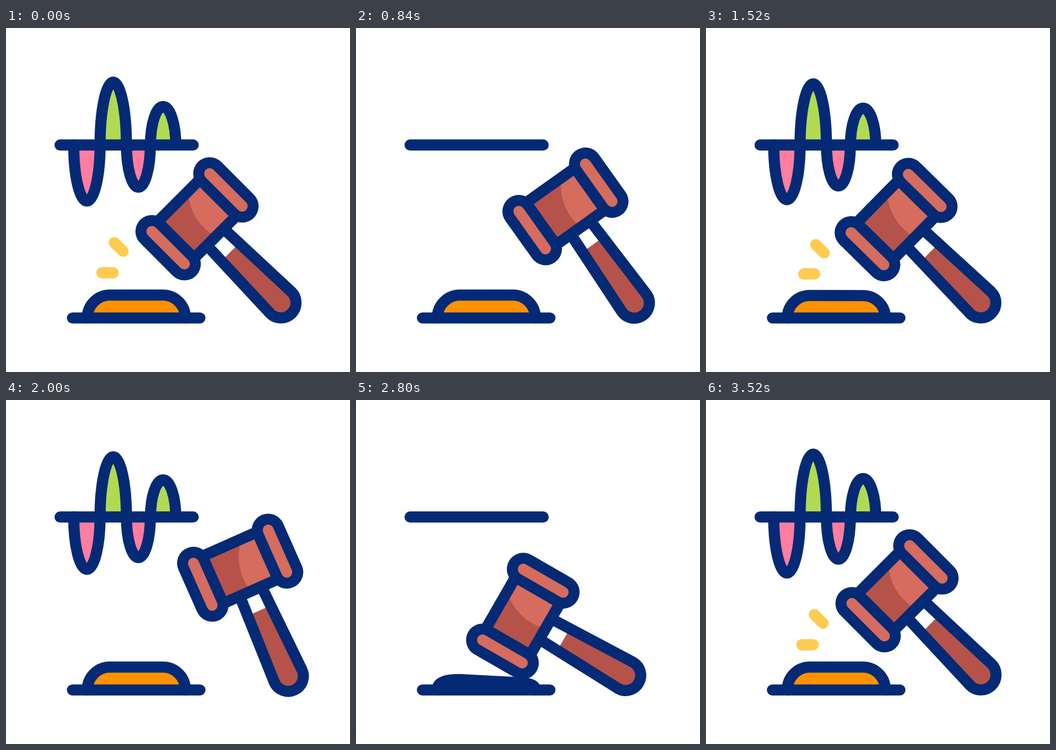
Recreate the animation shown at these times as an HTML page with a canvas. Size 640 by 640 pixels, loop 3.6 s.

```html
<!DOCTYPE html>
<html lang="en">
<head>
<meta charset="utf-8">
<title>Gavel</title>
<style>
  html, body { margin: 0; width: 100%; height: 100%; overflow: hidden; background: #fff; }
  canvas { display: block; width: 100vmin; height: 100vmin; }
</style>
</head>
<body>
<canvas id="stage" width="640" height="640"></canvas>
<script>
const ctx = document.getElementById('stage').getContext('2d');

const NAVY = '#042a75', GREEN = '#b1da53', PINK = '#ff7da1', ORANGE = '#ff9100';
const YELLOW = '#ffcb50', LIGHT = '#d56c5e', DARK = '#b5534a';
const LINE = 20.7;

// Two equal strokes, then a short rest until the loop ends.
const LOOP = 3600, CYCLE = 1760, HIT = 1057;
const LIFT_START = 25, LIFT_END = 268, LIFT = 21.9, STRIKE = -18.1;
const AXIS_Y = 217.7, FLOOR_Y = 539.5;

const waves = [
  { x: 150.5, rx: 24.5, h: 104.3, fill: PINK, fall: [158, 517], grow: 1067, rate: .0077 },
  { x: 199.5, rx: 24.5, h: -117, fill: GREEN, fall: [174, 533], grow: 1099, rate: .0082 },
  { x: 246.3, rx: 22.2, h: 78.5, fill: PINK, fall: [177, 530], grow: 1099, rate: .0081 },
  { x: 292.3, rx: 23.5, h: -71.5, fill: GREEN, fall: [171, 615], grow: 1099, rate: .0072 }
];

const sparks = [
  { x: 209.7, y: 407.3, dx: 81, dy: 123, angle: Math.PI / 4, length: 23 },
  { x: 189, y: 455.5, dx: 112, dy: 71.5, angle: 0, length: 21 }
];

const clamp = v => Math.min(1, Math.max(0, v));
const smooth = v => { v = clamp(v); return v * v * (3 - 2 * v); };

// Share still left of a decay that starts at `start` and ends with the cycle.
function decay(p, start, rate = .0073) {
  const end = Math.exp(-rate * (CYCLE - start));
  return (Math.exp(-rate * (p - start)) - end) / (1 - end);
}

function outline(fill) {
  if (fill) {
    ctx.fillStyle = fill;
    ctx.fill();
  }
  ctx.strokeStyle = NAVY;
  ctx.lineWidth = LINE;
  ctx.stroke();
}

function segment(x1, y1, x2, y2, width = LINE, color = NAVY) {
  ctx.beginPath();
  ctx.moveTo(x1, y1);
  ctx.lineTo(x2, y2);
  ctx.lineWidth = width;
  ctx.strokeStyle = color;
  ctx.stroke();
}

function drawWaves(p) {
  for (const { x, rx, h, fill, fall, grow, rate } of waves) {
    const size = p < grow ? 1 - smooth((p - fall[0]) / fall[1]) : 1 - decay(p, grow, rate);
    if (size < .002) continue;
    ctx.beginPath();
    ctx.ellipse(x, AXIS_Y, rx, Math.abs(h) * size, 0, Math.PI, 0, h > 0);
    outline(fill);
  }
  segment(100.6, AXIS_Y, 348.2, AXIS_Y);
}

function drawPad(p) {
  const press = p < HIT ? Math.pow(clamp((p - 970) / (HIT - 970)), 1.3) : decay(p, HIT);
  const left = 496.8 + 31 * press, right = 496.8 + 38 * press;
  const rise = .55 + .4 * press;
  ctx.beginPath();
  ctx.moveTo(151.3, FLOOR_Y);
  ctx.bezierCurveTo(151.3, FLOOR_Y + (left - FLOOR_Y) * rise, 170, left, 193, left);
  ctx.lineTo(292, right);
  ctx.bezierCurveTo(315, right, 333.7, FLOOR_Y + (right - FLOOR_Y) * rise, 333.7, FLOOR_Y);
  outline(ORANGE);
  segment(123.6, FLOOR_Y, 360.8, FLOOR_Y);
}

function gavelAngle(p) {
  if (p < LIFT_END) return LIFT * smooth((p - LIFT_START) / (LIFT_END - LIFT_START));
  if (p < HIT) {
    const u = (p - LIFT_END) / (HIT - LIFT_END);
    return LIFT + (STRIKE - LIFT) * Math.pow(u, 3.65);
  }
  return STRIKE * decay(p, HIT);
}

function handlePath() {
  ctx.beginPath();
  ctx.moveTo(-22, 48);
  ctx.lineTo(-28.2, 219.5);
  ctx.arc(-.1, 220.7, 28.2, Math.PI, 0, true);
  ctx.lineTo(22, 48);
  ctx.closePath();
}

function drawGavel(p) {
  ctx.save();
  ctx.translate(511, 549);
  ctx.rotate(gavelAngle(p) * Math.PI / 180);
  ctx.translate(355.4 - 511, 355 - 549);
  ctx.rotate(-Math.PI / 4);

  // Local axes: x runs along the head, y down the handle.
  handlePath();
  ctx.fillStyle = '#fff';
  ctx.fill();
  ctx.save();
  ctx.clip();
  ctx.fillStyle = DARK;
  ctx.fillRect(-40, 87.5, 80, 180);
  ctx.restore();
  handlePath();
  outline();

  ctx.fillStyle = DARK;
  ctx.fillRect(-60, -48, 120, 96);
  ctx.beginPath();
  ctx.moveTo(24, -48);
  ctx.quadraticCurveTo(-13, -4, 1, 48);
  ctx.lineTo(60, 48);
  ctx.lineTo(60, -48);
  ctx.fillStyle = LIGHT;
  ctx.fill();
  ctx.beginPath();
  ctx.rect(-60, -48, 120, 96);
  outline();

  for (const x of [-76, 76]) {
    segment(x, -42.8, x, 42.8, 61.2);
    segment(x, -42.8, x, 42.8, 20.4, LIGHT);
  }
  ctx.restore();
}

function drawSparks(p) {
  const flying = p >= HIT;
  const left = flying ? decay(p, HIT) : 0;
  const scale = flying ? 1 : 1 - smooth((p - 30) / 170);
  if (scale <= 0) return;
  for (const { x, y, dx, dy, angle, length } of sparks) {
    const half = length / 2 * scale * clamp(1 - 1.25 * left) + .1;
    const cx = x + dx * left, cy = y + dy * left;
    const ox = Math.cos(angle) * half, oy = Math.sin(angle) * half;
    segment(cx - ox, cy - oy, cx + ox, cy + oy, 20.8 * scale, YELLOW);
  }
}

function draw(now) {
  const t = now % LOOP;
  const p = t < 2 * CYCLE ? t % CYCLE : 0;
  ctx.fillStyle = '#fff';
  ctx.fillRect(0, 0, 640, 640);
  ctx.lineCap = 'round';
  ctx.lineJoin = 'round';
  drawWaves(p);
  drawPad(p);
  drawGavel(p);
  drawSparks(p);
}

let start;
function tick(now) {
  if (start === undefined) start = now;
  draw(now - start);
  requestAnimationFrame(tick);
}
draw(0);
requestAnimationFrame(tick);
</script>
</body>
</html>
```
